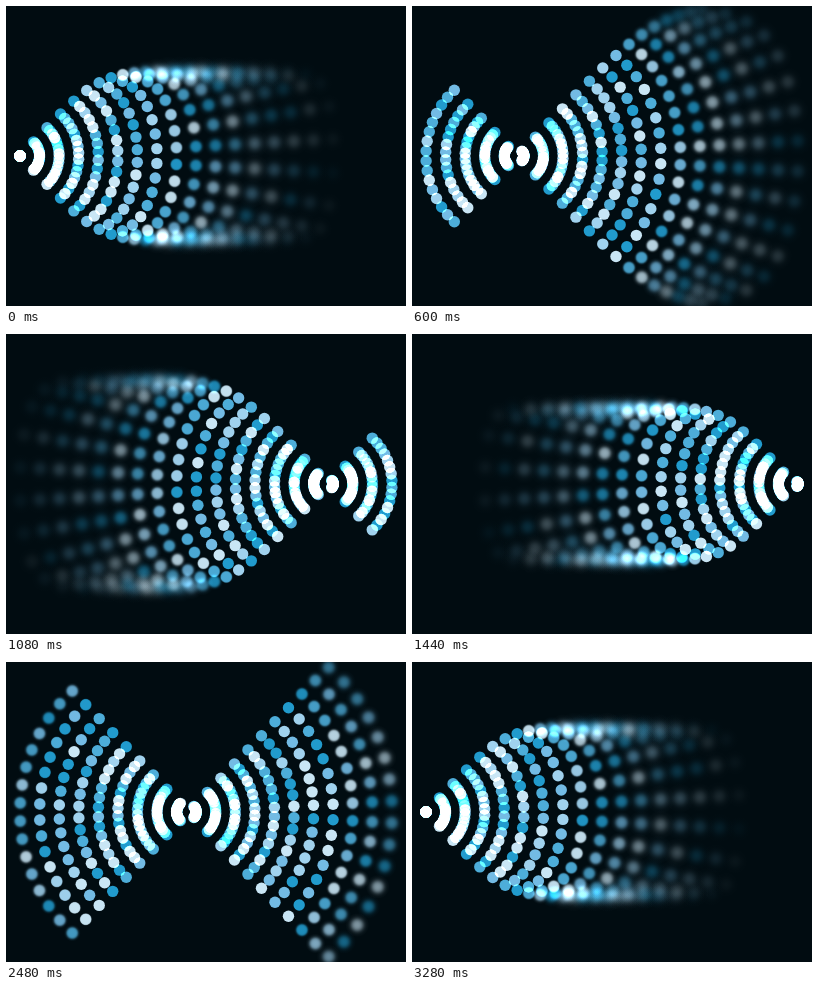
Recreate the animation shown at these times as an HTML page with a canvas. Size 400 by 300 pixels, loop 3400 ms.

```html
<!DOCTYPE html>
<html lang="en">
<head>
<meta charset="utf-8">
<title>Dot waves</title>
<style>
html, body { margin: 0; width: 100%; height: 100%; overflow: hidden; background: #010c11; }
canvas { display: block; width: 400px; height: 300px; }
</style>
</head>
<body>
<canvas id="stage" width="400" height="300"></canvas>
<script>
const ctx = document.getElementById('stage').getContext('2d');
const LOOP = 3400, STEP = 40;
const COLS = 20, ROWS = 16, LAST = COLS - 1;
const LEFT = 14, GAP = 372 / LAST, MID = 150;
const RADIUS = 5.7, SPREAD = 46.3 * Math.PI / 180;
const PALETTE = ['222,242,253', '126,194,234', '36,158,208', '84,178,222', '176,219,245'];

const clamp = (v, lo, hi) => Math.min(hi, Math.max(lo, v));

function random(seed) {
  return () => {
    seed = (seed * 1664525 + 1013904223) >>> 0;
    return seed / 4294967296;
  };
}

const rnd = random(71);
const colors = Array.from({ length: COLS * ROWS },
  () => PALETTE[Math.floor(rnd() * PALETTE.length)]);

// S-curve whose two halves may have different steepness
function ease(u, a, b) {
  u = clamp(u, 0, 1);
  const n = u < 0.5 ? a : b;
  const v = u ** n;
  return v / (v + (1 - u) ** n);
}

// Position of the centre, counted in columns
function centre(t) {
  return t < 1650
    ? LAST * ease(t / 1640, 2.04, 2.4)
    : LAST * (1 - ease((t - 1650) / 1600, 2.5, 2.5));
}

// Height at which the arcs flatten out
function ceiling(p) {
  if (p < LAST / 2) return 86 + 9 * p + 1.3 * p * p;
  const e = LAST - p;
  return 77 + 5.5 * e + 0.8 * e * e + 0.11 * e ** 3;
}

function dot(x, y, rgb, alpha, blur) {
  if (blur < 0.2) {
    ctx.fillStyle = `rgba(${rgb},${alpha})`;
    ctx.beginPath();
    ctx.arc(x, y, RADIUS, 0, 2 * Math.PI);
    ctx.fill();
    return;
  }
  const outer = RADIUS + 2.6 * blur;
  const peak = alpha * (1 - Math.exp(-RADIUS * RADIUS / (2 * blur * blur)));
  const fill = ctx.createRadialGradient(x, y, 0, x, y, outer);
  for (let i = 0; i <= 12; i++) {
    const r = outer * i / 12;
    const a = i === 12 ? 0 : peak / (1 + Math.exp((r - RADIUS) / (0.6 * blur)));
    fill.addColorStop(i / 12, `rgba(${rgb},${a.toFixed(4)})`);
  }
  ctx.fillStyle = fill;
  ctx.fillRect(x - outer, y - outer, 2 * outer, 2 * outer);
}

function draw(t) {
  const p = centre(t), top = ceiling(p), cx = LEFT + p * GAP;
  ctx.globalCompositeOperation = 'source-over';
  ctx.fillStyle = '#010c11';
  ctx.fillRect(0, 0, 400, 300);
  ctx.globalCompositeOperation = 'lighter';
  for (let k = 0; k < COLS; k++) {
    const d = Math.abs(k - p), side = k < p ? -1 : 1;
    const alpha = 0.9 * clamp((16.5 - d) / 9, 0, 1);
    if (!alpha) continue;
    const blur = clamp((d - 7.2) * 0.75, 0, 3.4);
    for (let j = 0; j < ROWS; j++) {
      const a = SPREAD * (2 * j / (ROWS - 1) - 1);
      const y = d * GAP * Math.sin(a);
      const bent = y / (1 + Math.abs(y / top) ** 4.5) ** (1 / 4.5);
      const x = d * GAP * Math.cos(a) - 0.17 * Math.abs(y - bent);
      dot(cx + side * x, MID + bent, colors[k * ROWS + j], alpha, blur);
    }
  }
}

const start = performance.now();
function frame(now) {
  const t = Math.max(0, now - start) % LOOP;
  draw(Math.floor(t / STEP) * STEP);
  requestAnimationFrame(frame);
}
draw(0);
requestAnimationFrame(frame);
</script>
</body>
</html>
```
